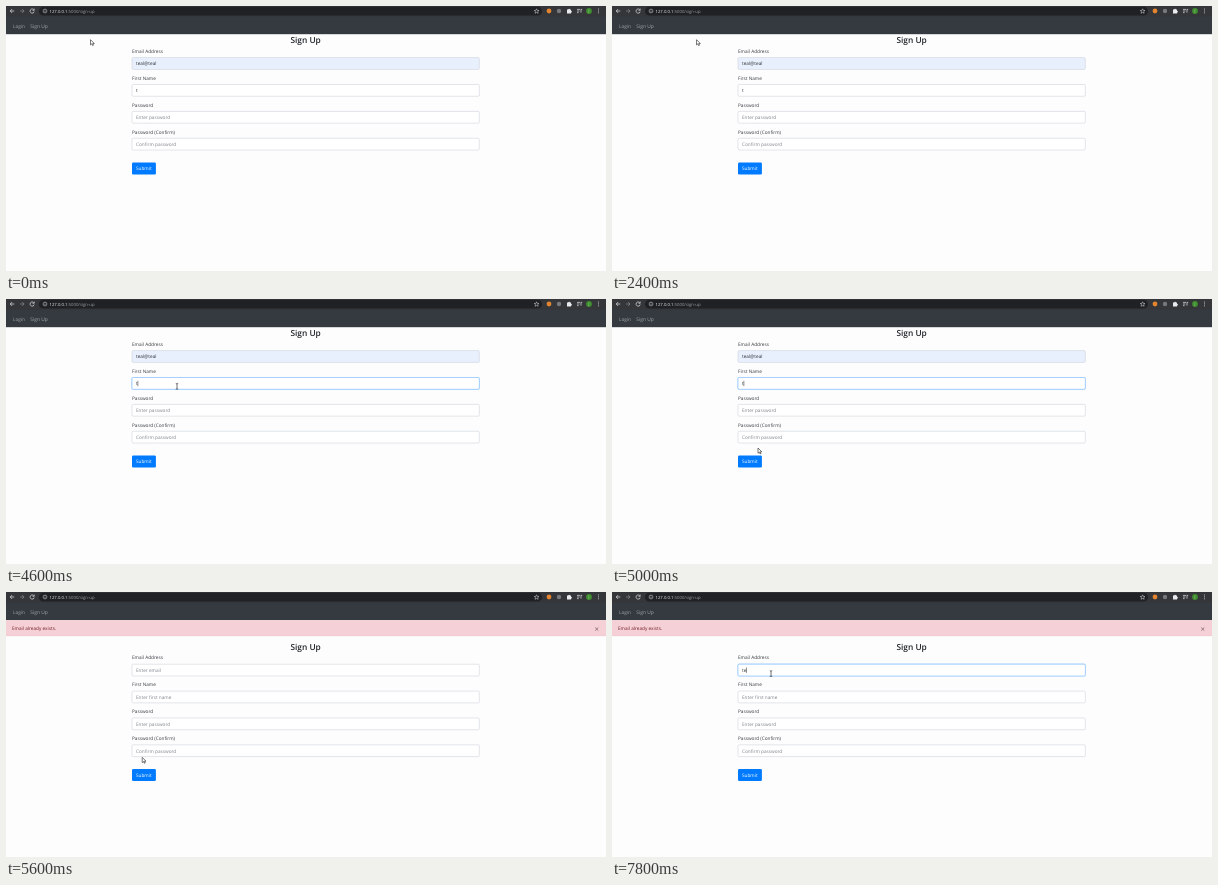
Recreate the animation shown at these times as an HTML page. Size 600 by 265 pixels, loop 8 s.

```html
<!DOCTYPE html>
<html lang="en">
<head>
<meta charset="utf-8">
<title>Sign Up</title>
<style>
html, body { margin: 0; width: 100%; height: 100%; overflow: hidden; background: #fdfdfe; }
svg { display: block; width: 600px; height: 265px; }
text { font: 4.72px "Open Sans", "Noto Sans", sans-serif; text-rendering: geometricPrecision; fill: #33383d; }
.title { font-size: 8.35px; font-weight: 600; fill: #212529; }
.url { font-size: 4.25px; fill: #9aa0a6; }
.nav { fill: #a3a7ab; }
.line { fill: none; stroke: #dfe1e5; stroke-width: .7; }
.dim { stroke: #85888d; }
</style>
</head>
<body>
<svg viewBox="0 0 600 265">
  <rect width="600" height="265" fill="#fdfdfe"/>
  <rect width="600" height="11" fill="#35363a"/>
  <rect x="33" y=".8" width="503" height="8.8" rx="4.4" fill="#202124"/>
  <path class="line" d="M8.3 5H4.2M6.2 3L4.2 5L6.2 7"/>
  <path class="line dim" d="M14 5h4.1M16.1 3l2 2l-2 2"/>
  <path id="reload" class="line" d="M27.7 3.6A2.1 2.1 0 1 0 28.2 5.5M28.2 2.6V4.3H26.5"/>
  <path id="stop" class="line" d="M24.6 3.4l3.4 3.4M28 3.4l-3.4 3.4"/>
  <circle class="line" cx="39" cy="5" r="1.9" style="stroke-width:.5"/>
  <path class="line" d="M39 4.7v1.4M39 3.6v.5" style="stroke-width:.5"/>
  <text class="url" x="43.5" y="6.6"><tspan fill="#e8eaed">127.0.0.1</tspan>:5000/sign-up</text>
  <path class="line" style="stroke-width:.5" d="M530.6 2.8l.7 1.6l1.7.1l-1.3 1.1l.4 1.7l-1.5-.9l-1.5.9l.4-1.7l-1.3-1.1l1.7-.1z"/>
  <circle cx="543" cy="5" r="2.4" fill="#e2852e"/>
  <circle cx="553" cy="5" r="2.2" fill="#77797d"/>
  <path fill="#e8eaed" d="M561 3.6h1.2a.9.9 0 0 1 1.8 0h1v1.2a.9.9 0 0 1 0 1.8v1h-4z"/>
  <path class="line" d="M571 3.4h3.2M571 5h2.4M571 6.6h1.6M575 6.6V3.4h1.2"/>
  <circle cx="583" cy="5" r="2.9" fill="#3f8f2f"/>
  <text x="583" y="6.2" text-anchor="middle" style="font-size:3.4px;fill:#dfead9">J</text>
  <path d="M592.5 3v4.6" stroke="#dfe1e5" stroke-width=".9" stroke-linecap="round" stroke-dasharray="0 1.9"/>
  <rect y="10.6" width="600" height="17.6" fill="#343a40"/>
  <text class="nav" x="7" y="21.6">Login</text>
  <text class="nav" x="24.3" y="21.6" style="font-size:4.9px">Sign Up</text>
  <g id="alert">
    <rect y="28.2" width="600" height="15.8" fill="#f5d0d6"/>
    <path d="M0 43.8H600" stroke="#f0c3ca" stroke-width=".4"/>
    <text x="6" y="38.4" style="fill:#721c24">Email already exists.</text>
    <path d="M589.2 35.5l3.1 3.1M592.3 35.5l-3.1 3.1" stroke="#7b666a" stroke-width=".8"/>
  </g>
  <g id="form">
    <text class="title" x="299.6" y="37.3" text-anchor="middle">Sign Up</text>
    <g id="fields"></g>
    <rect id="ring" x="125.4" y="155.9" width="25.2" height="13.1" rx="1.8" fill="#80bdff"/>
    <rect id="button" x="126" y="156.5" width="23.9" height="11.9" rx="1.25"/>
    <text x="130" y="164.3" style="fill:#fff">Submit</text>
  </g>
  <g id="cursor" stroke-linejoin="round">
    <path id="arrow" d="M0 0V5.2L1.3 4.1L2.1 5.9L3 5.5L2.2 3.8H3.8Z" fill="#fff" stroke="#222" stroke-width=".6"/>
    <path id="beam" d="M-1.2-2.9Q0-2.9 0-2.2V2.2Q0 2.9-1.2 2.9M1.2-2.9Q0-2.9 0-2.2M0 2.2Q0 2.9 1.2 2.9" fill="none" stroke="#222" stroke-width=".65"/>
    <path id="hand" d="M-1.1-3Q-.5-3.7.1-3V-.8L2.6-.2Q3.3 0 3.2.8L2.6 3.6H-.5L-2.6.9Q-2.3 0-1.1.7Z" fill="#fff" stroke="#222" stroke-width=".6"/>
  </g>
</svg>
<script>
const LOOP = 8000, STEP = 200, ALERT_SHIFT = 20.6;
const FIELD = { x: 126, y: 51.6, w: 347.3, h: 11.8, gap: 26.88 };
const SUBMIT_AT = 5400, RELOADED = 5600;
const el = id => document.getElementById(id);

// Pointer waypoints: time, x, y
const path = [
  [0, 84.5, 33.7], [2400, 84.5, 33.7], [2600, 100, 45], [2800, 150, 72],
  [3000, 199, 98], [3200, 170, 150], [3400, 108, 175.5], [3600, 75.5, 181.2],
  [3800, 75.5, 181.2], [4000, 82, 170], [4200, 122, 122], [4400, 168, 88],
  [4600, 171, 87.4], [4800, 164, 106], [5000, 146, 149], [5200, 139.6, 167],
  [5400, 139.6, 168.3], [5600, 136.2, 165.4], [6400, 138, 158], [6600, 143, 140],
  [6800, 150, 110], [7000, 157, 88], [7200, 159, 81.6], [8000, 159, 81.6]
];

function node(tag, attrs, parent) {
  const n = document.createElementNS("http://www.w3.org/2000/svg", tag);
  for (const k in attrs) n.setAttribute(k, attrs[k]);
  return parent.appendChild(n);
}

const labels = ["Email Address", "First Name", "Password", "Password (Confirm)"];
const hints = ["Enter email", "Enter first name", "Enter password", "Confirm password"];
const fields = labels.map((label, i) => {
  const { x, w, h } = FIELD, y = FIELD.y + i * FIELD.gap, g = el("fields");
  node("text", { x, y: y - 4.7 }, g).textContent = label;
  return {
    y,
    ring: node("rect", { x: x - .6, y: y - .6, width: w + 1.2, height: h + 1.2, rx: 1.8, fill: "#bfdeff" }, g),
    box: node("rect", { x, y, width: w, height: h, rx: 1.2, "stroke-width": .6 }, g),
    text: node("text", { x: 130, y: y + 7.8 }, g),
    caret: node("path", { stroke: "#222", "stroke-width": .5 }, g)
  };
});

const show = (n, on) => n.setAttribute("visibility", on ? "visible" : "hidden");

function drawField(f, i, value, focused, autofilled) {
  f.text.textContent = value || hints[i];
  f.text.style.fill = value ? "#2b2f33" : "#7d848b";
  f.box.setAttribute("fill", autofilled ? "#e8f0fe" : "#fff");
  f.box.setAttribute("stroke", focused ? "#80bdff" : "#ced4da");
  show(f.ring, focused);
  show(f.caret, focused);
  if (focused) {
    const x = 130.2 + (value ? f.text.getComputedTextLength() : 0);
    f.caret.setAttribute("d", `M${x} ${f.y + 3.3}v5.4`);
  }
}

function pointerAt(t) {
  const i = Math.max(1, path.findIndex(p => p[0] >= t));
  const [t0, x0, y0] = path[i - 1], [t1, x1, y1] = path[i];
  const k = (t - t0) / (t1 - t0);
  // The pointer rests after the page reloads.
  if (t0 === RELOADED && t < t1) return [x0, y0];
  return [x0 + (x1 - x0) * k, y0 + (y1 - y0) * k];
}

function render(time) {
  const t = Math.floor(time % LOOP / STEP) * STEP;
  const reloaded = t >= RELOADED, clicked = t >= SUBMIT_AT && !reloaded;
  const shift = reloaded ? ALERT_SHIFT : 0;
  const values = reloaded ? [t >= 7800 ? "te" : "", ""] : ["teal@teal", "t"];
  const focus = t >= 7400 ? 0 : t >= 4400 && t < SUBMIT_AT ? 1 : -1;

  show(el("alert"), reloaded);
  show(el("stop"), clicked);
  show(el("reload"), !clicked);
  el("form").setAttribute("transform", `translate(0 ${shift})`);
  fields.forEach((f, i) => drawField(f, i, values[i], i === focus, i === 0 && !reloaded));

  const [x, y] = pointerAt(t), py = y - shift;
  const overField = x > FIELD.x && fields.some(f => py > f.y && py < f.y + FIELD.h);
  const overButton = x > 126 && x < 150 && py > 156.5 && py < 168.5;
  show(el("beam"), overField);
  show(el("hand"), overButton);
  show(el("arrow"), !overField && !overButton);
  el("cursor").setAttribute("transform", `translate(${x} ${y})`);
  el("button").setAttribute("fill", overButton ? "#0069d9" : "#007bff");
  show(el("ring"), clicked);
}

const start = performance.now();
function tick() {
  render(performance.now() - start);
  requestAnimationFrame(tick);
}
tick();
</script>
</body>
</html>
```
